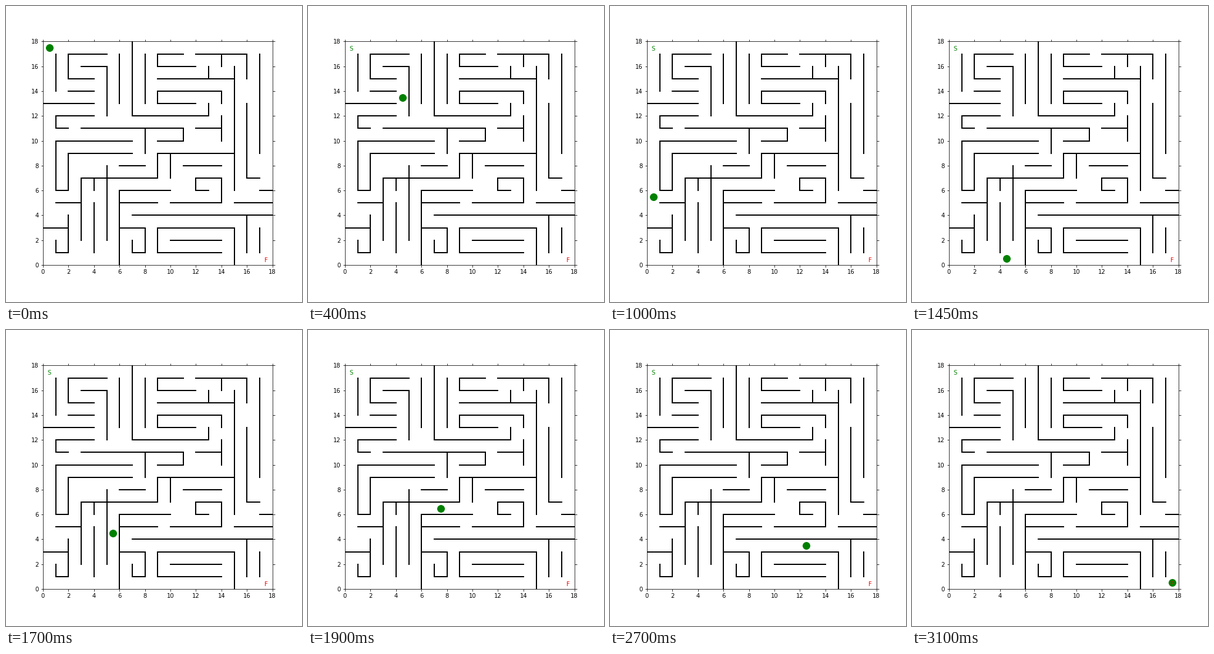
A matplotlib script for the animation above (3150 ms loop, 504 by 504 pixels).

```python
import matplotlib.pyplot as plt
from matplotlib.animation import FuncAnimation

SIZE = 18
START, GOAL = (0, SIZE - 1), (SIZE - 1, 0)
STEP = {"D": (0, -1), "R": (1, 0), "U": (0, 1), "L": (-1, 0)}

# Wall strokes: starting grid point, then straight runs
WALLS = """
1 17 D3 / 5 17 L3 D2 R2 / 6 17 D4 / 8 17 D4 / 11 17 L2 D1 R3
12 17 R4 D2 / 14 17 D1 / 17 17 D8 / 3 16 R2 D4 / 13 16 D1
9 15 R6 / 15 16 D10 / 15 9 L6 D2 L6 D5 / 7 18 D6 R6 U1
2 14 R2 / 14 13 U1 L5 D1 R3 / 0 13 R4 / 4 12 L3 D1 R1
3 11 R8 D1 L2 / 12 11 R2 / 14 12 D2 / 16 13 D6 R1
7 10 L6 D4 R1 U3 R5 / 8 11 D2 / 10 9 D2 / 6 8 R2 / 11 8 R3
13 6 L1 U1 R2 D2 L4 / 10 6 L4 D6 / 17 6 R1 / 5 8 D6 / 4 7 D1
1 5 R2 / 4 5 D4 / 6 5 R3 / 15 5 R3 / 7 4 R11 / 16 4 D3
0 3 R2 / 2 4 D3 L1 U1 / 6 3 R2 D2 L1 U1 / 17 3 D2
14 1 L5 U2 R6 D3 / 10 2 R4
"""


def trace(stroke):
    """Unit-spaced grid points along one wall stroke."""
    x, y, *runs = stroke.split()
    points = [(int(x), int(y))]
    for run in runs:
        dx, dy = STEP[run[0]]
        for _ in range(int(run[1:])):
            x, y = points[-1]
            points.append((x + dx, y + dy))
    return points


def edge(cell, step):
    """Grid edge crossed when leaving a cell in the given direction."""
    (x, y), (dx, dy) = cell, step
    if dx:
        x += dx > 0
        return frozenset([(x, y), (x, y + 1)])
    y += dy > 0
    return frozenset([(x, y), (x + 1, y)])


def solve(blocked):
    """Shortest route by breadth-first search."""
    came_from = {START: None}
    queue = [START]
    for cell in queue:
        for dx, dy in STEP.values():
            new = cell[0] + dx, cell[1] + dy
            inside = all(0 <= c < SIZE for c in new)
            if inside and new not in came_from and edge(cell, (dx, dy)) not in blocked:
                came_from[new] = cell
                queue.append(new)
    route, cell = [], GOAL
    while cell:
        route.append(cell)
        cell = came_from[cell]
    return route[::-1]


strokes = [trace(s) for s in WALLS.strip().replace("\n", "/").split("/")]
path = solve({frozenset(pair) for s in strokes for pair in zip(s, s[1:])})

fig, ax = plt.subplots(figsize=(7, 7), dpi=72, facecolor="white")
fig.subplots_adjust(left=0.125, right=0.9, bottom=0.125, top=0.88)
ax.set(xlim=(0, SIZE), ylim=(0, SIZE),
       xticks=range(0, SIZE + 1, 2), yticks=range(0, SIZE + 1, 2))
ax.tick_params(top=True, right=True)

for points in strokes:
    ax.plot(*zip(*points), "k-", lw=2, solid_joinstyle="miter")

for (x, y), label, color in [(START, "S", "green"), (GOAL, "F", "red")]:
    ax.text(x + 0.5, y + 0.25, label, color=color, size=10, ha="center")

ball, = ax.plot([], [], "o", color="green", ms=12)


def draw(i):
    x, y = path[i]
    ball.set_data([x + 0.5], [y + 0.5])
    return ball,


anim = FuncAnimation(fig, draw, frames=len(path), interval=50,
                     repeat=True, repeat_delay=0)
plt.show()
```
